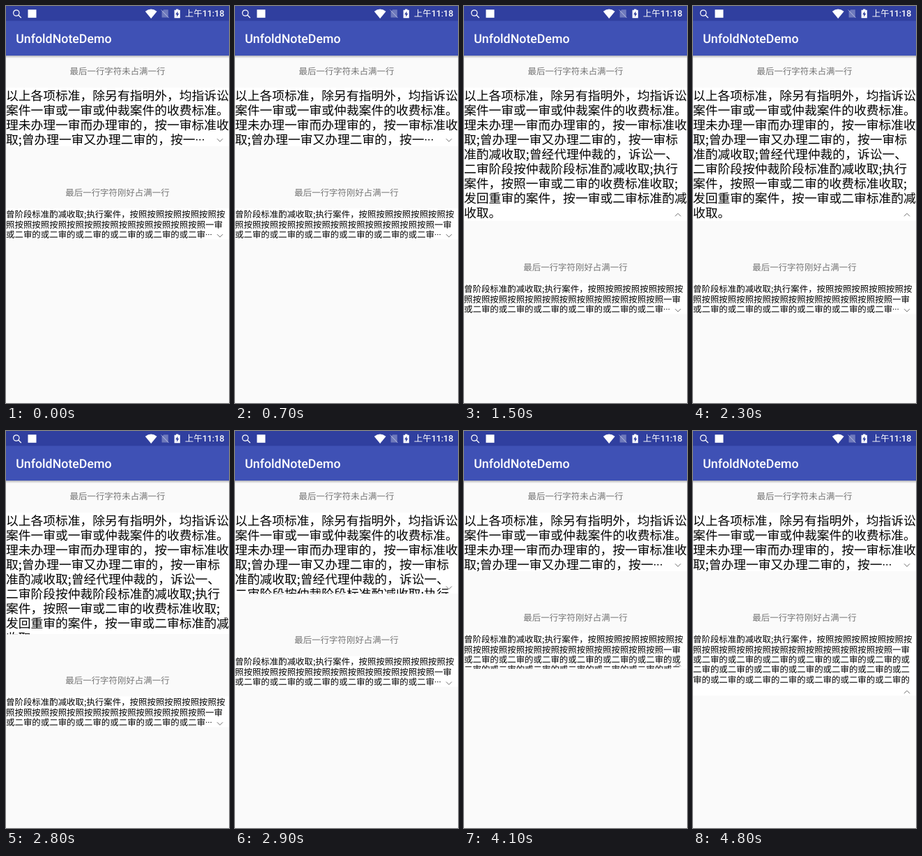
Recreate the animation shown at these times as an HTML page. Size 320x569 px, loop 4900 ms.

```html
<!DOCTYPE html>
<html lang="zh-CN">
<head>
<meta charset="utf-8">
<title>UnfoldNoteDemo</title>
<style>
  html, body { margin: 0; width: 100%; height: 100%; overflow: hidden; background: #fafafa; }
  #stage { display: block; width: 320px; height: 569px; }
  text {
    font-family: "Noto Sans CJK SC", "Noto Sans CJK", sans-serif;
    text-rendering: geometricPrecision;
  }
  .latin { font-family: Roboto, "Noto Sans CJK SC", "Noto Sans CJK", sans-serif; }
  .label { font-size: 12.44px; fill: #757575; text-anchor: middle; }
  .arrow { fill: none; stroke: #6c6c6c; stroke-width: 1; }
</style>
</head>
<body>
<svg id="stage" viewBox="0 0 320 569" xmlns="http://www.w3.org/2000/svg">
  <defs>
    <linearGradient id="shade" x2="0" y2="1">
      <stop offset="0" stop-color="#000" stop-opacity=".26"/>
      <stop offset="1" stop-color="#000" stop-opacity="0"/>
    </linearGradient>
  </defs>
  <rect width="320" height="569" fill="#fafafa"/>
  <rect y="71" width="320" height="4" fill="url(#shade)"/>
  <rect width="320" height="71.1" fill="#3f51b5"/>
  <rect width="320" height="21.3" fill="#303f9f"/>

  <!-- status bar -->
  <g fill="none" stroke="#fff" stroke-width="1.2">
    <circle cx="14.8" cy="10" r="4.2"/>
    <path d="M17.8 13 21.8 17"/>
  </g>
  <rect x="31.5" y="5.2" width="12" height="11.6" fill="#fff"/>
  <path d="M199.8 7.7Q208.2 1.3 216.6 7.7L208.2 18Z" fill="#fff"/>
  <path d="M226.4 5.2H232.8V16.6H223.6V8Z" fill="#fff" fill-opacity=".3"/>
  <path d="M222.5 5.5 233.5 17" stroke="#fff" stroke-opacity=".5"/>
  <path d="M244 4.4H247.4V5.7H249.8V17.2H241.6V5.7H244Z" fill="#fff"/>
  <path d="M246.4 7.5 243.2 12.3H245.2V15.7L248.3 10.8H246.4Z" fill="#303f9f"/>
  <text class="latin" x="256.8" y="15" font-size="12.44" font-weight="500" fill="#fff">上午11:18</text>

  <text class="latin" x="14.2" y="53.2" font-size="17.78" font-weight="500" fill="#fff">UnfoldNoteDemo</text>
  <text class="label" x="160" y="97.8">最后一行字符未占满一行</text>
  <g id="lower">
    <text class="label" x="160" y="272">最后一行字符刚好占满一行</text>
  </g>
</svg>
<script>
const NS = 'http://www.w3.org/2000/svg';
const LOOP = 4900, STEP = 100, DURATION = 270;
const stage = document.getElementById('stage');
const lower = document.getElementById('lower');

function add(parent, tag, attrs, text = '') {
  const el = document.createElementNS(NS, tag);
  for (const key in attrs) el.setAttribute(key, attrs[key]);
  el.textContent = text;
  return parent.appendChild(el);
}

// A text block that clips its lines to the current height.
function makePanel(parent, o) {
  const box = add(parent, 'svg', { x: 0, y: o.top, width: 320, height: o.closed, overflow: 'hidden' });
  add(box, 'rect', { width: 320, height: '100%', fill: '#fff' });
  const line = (parent, text, i) =>
    add(parent, 'text', { x: 0, y: o.base + i * o.leading, 'font-size': o.size }, text);
  const short = add(box, 'g', {}), full = add(box, 'g', {});
  o.lines.forEach((text, i) => line(i < o.cut ? box : full, text, i));
  add(line(short, o.tail, o.cut), 'tspan', { class: 'latin' }, '···');
  const arrow = add(box, 'path', { class: 'arrow' });

  return (open, showFull, up) => {
    const height = o.closed + (o.open - o.closed) * open;
    box.setAttribute('height', height);
    short.style.display = showFull ? 'none' : '';
    full.style.display = showFull ? '' : 'none';
    const dy = up ? -2 : 2, y = height - o.arrowGap;
    arrow.setAttribute('d', `M303 ${y - dy}L307 ${y + dy}L311 ${y - dy}`);
    return height - o.closed;
  };
}

const drawBig = makePanel(stage, {
  top: 117, closed: 84, open: 191, size: 17.78, base: 17.6, leading: 21, arrowGap: 8.7, cut: 3,
  tail: '取;曾办理一审又办理二审的，按一',
  lines: [
    '以上各项标准，除另有指明外，均指诉讼',
    '案件一审或一审或仲裁案件的收费标准。',
    '理未办理一审而办理审的，按一审标准收',
    '取;曾办理一审又办理二审的，按一审标',
    '准酌减收取;曾经代理仲裁的，诉讼一、',
    '二审阶段按仲裁阶段标准酌减收取;执行',
    '案件，按照一审或二审的收费标准收取;',
    '发回重审的案件，按一审或二审标准酌减',
    '收取。'
  ]
});

const phrase = '或二审的';
const drawSmall = makePanel(lower, {
  top: 290, closed: 44.5, open: 89.5, size: 12.44, base: 13.1, leading: 14.4, arrowGap: 5.3, cut: 2,
  tail: phrase.repeat(5) + '或二审',
  lines: [
    '曾阶段标准酌减收取;执行案件，' + '按照'.repeat(5) + '按',
    '照' + '按照'.repeat(11) + '一审',
    phrase.repeat(6) + '或',
    '二审的' + phrase.repeat(5) + '或二',
    '审的' + phrase.repeat(2) + '二审的' + phrase.repeat(3)
  ]
});

function ease(t, start) {
  const p = Math.min(1, Math.max(0, (t - start) / DURATION));
  return (1 - Math.cos(Math.PI * p)) / 2;
}

function draw(now) {
  // The screen refreshes ten times a second.
  const t = Math.floor((now % LOOP) / STEP) * STEP;
  const big = ease(t, 1230) - ease(t, 2730);
  const shift = drawBig(big, t >= 1200 && t < 3000, t >= 1200 && t < 2800);
  lower.setAttribute('transform', `translate(0 ${shift})`);
  drawSmall(ease(t, 4035), t >= 4100, t >= 4100);
}

const begin = performance.now();
function tick() {
  draw(performance.now() - begin);
  requestAnimationFrame(tick);
}
tick();
</script>
</body>
</html>
```
